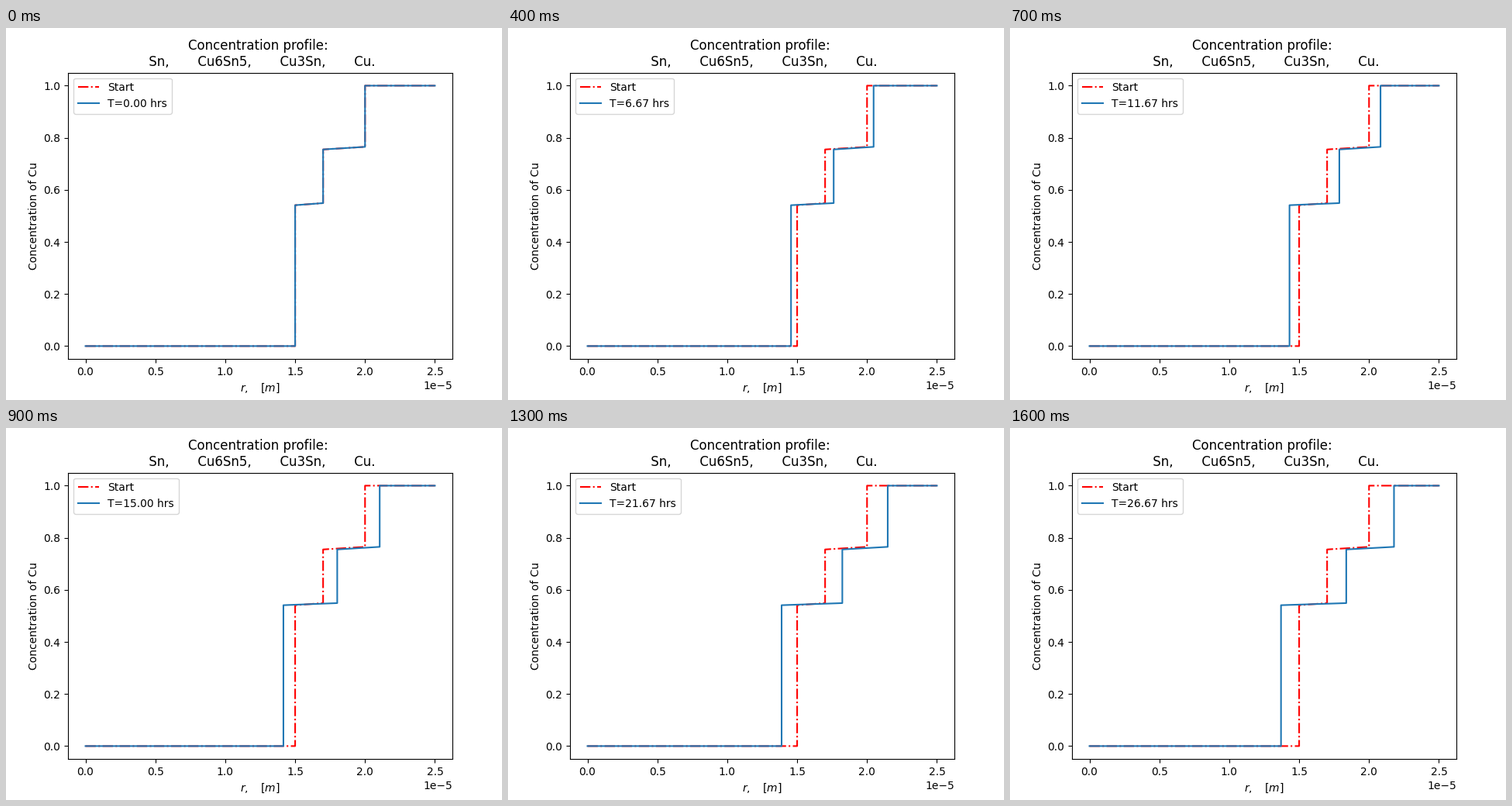
These frames come from a looping animation (640x480 px, 1.7 s). A matplotlib script:

```python
import matplotlib.pyplot as plt
from matplotlib.animation import FuncAnimation

FRAMES = 17
HOURS_PER_FRAME = 5 / 3
SUBSTEPS = 400
UNIT = 1e-5  # lengths below are in units of 10 micrometres

# copper fraction at the left and right side of each phase
LEVELS = [(0, 0), (0.541, 0.549), (0.755, 0.765), (1, 1)]
WALLS = (1.5, 1.7, 2.0)
LENGTH = 2.5
RATE_1, RATE_2 = 9.04e-4, 4.78e-4  # diffusion strength in the two middle phases


def jump(k):
    return LEVELS[k + 1][0] - LEVELS[k][1]


def grow(walls):
    """Advance the moving phase boundaries by one frame."""
    a, b, c = walls
    dt = HOURS_PER_FRAME / SUBSTEPS
    for _ in range(SUBSTEPS):
        flux_1 = RATE_1 / (b - a)
        flux_2 = RATE_2 / (c - b)
        a -= flux_1 / jump(0) * dt
        b += (flux_1 - flux_2) / jump(1) * dt
        c += flux_2 / jump(2) * dt
    return a, b, c


def profile(walls):
    edges = (0, *walls, LENGTH)
    xs = [x * UNIT for pair in zip(edges, edges[1:]) for x in pair]
    ys = [y for pair in LEVELS for y in pair]
    return xs, ys


history = [WALLS]
for _ in range(FRAMES - 1):
    history.append(grow(history[-1]))

fig, ax = plt.subplots(figsize=(6.4, 4.8), dpi=100)
ax.plot(*profile(WALLS), "r-.", label="Start")
line, = ax.plot(*profile(WALLS), color="C0", label="T=0.00 hrs")
gap = " " * 7
ax.set_title("Concentration profile: \n " + gap.join(["Sn,", "Cu6Sn5,", "Cu3Sn,", "Cu."]))
ax.set_xlabel(r"$r,\quad[m]$")
ax.set_ylabel("Concentration of Cu")
ax.set_xlim(-0.05 * LENGTH * UNIT, 1.05 * LENGTH * UNIT)
ax.set_ylim(-0.05, 1.05)
time_text = ax.legend(loc="upper left").get_texts()[1]


def update(i):
    line.set_data(*profile(history[i]))
    time_text.set_text(f"T={i * HOURS_PER_FRAME:.2f} hrs")
    return line, time_text


anim = FuncAnimation(fig, update, frames=FRAMES, interval=100, repeat=True, repeat_delay=0)
plt.show()
```
